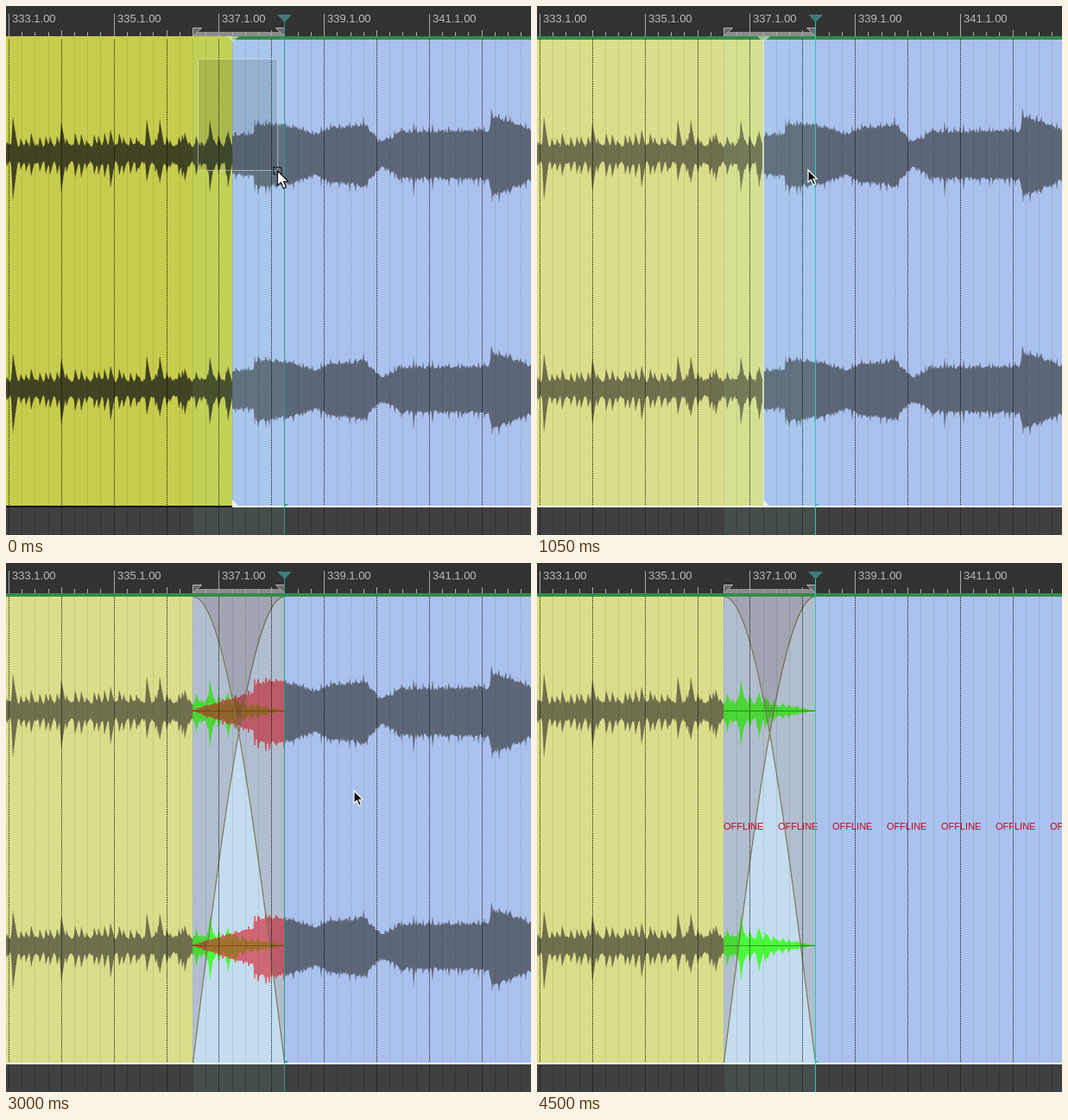
Recreate the animation shown at these times as an HTML page with a canvas. Size 608 by 613 pixels, loop 4600 ms.

```html
<!DOCTYPE html>
<html lang="en">
<head>
<meta charset="utf-8">
<title>Crossfade edit</title>
<style>
html, body { margin: 0; width: 100%; height: 100%; overflow: hidden; background: #333; }
canvas { display: block; width: 608px; height: 613px; }
</style>
</head>
<body>
<canvas id="stage" width="608" height="613"></canvas>
<script>
const ctx = document.getElementById('stage').getContext('2d');
const W = 608, H = 613, LOOP = 4600;
const TOP = 39, BOTTOM = 579, LEFT = 216, CUT = 262, RIGHT = 322;
const CENTERS = [171, 443];
const FONT = '"Liberation Sans", Arial, sans-serif';
const BLINKS = [150, 600, 1050, 1650, 2100, 2550, 3150, 3600, 4200];

// Loudest hits as x, height above and depth below the centre line.
const FIRST_HITS = [[8, 43, 55], [64, 37, 45], [121, 28, 40], [163, 40, 33],
  [178, 40, 35], [207, 25, 33], [236, 39, 45], [257, 27, 40]];
const SECOND_HITS = [[288, 41, 46], [322, 34, 43], [414, 44, 40], [472, 38, 51],
  [494, 36, 44], [562, 52, 38]];

// Loudness of the second clip as x, level.
const LOUDNESS = [[216, 20], [287, 22], [290, 34], [330, 31], [358, 22], [376, 29],
  [416, 32], [432, 14], [446, 17], [455, 25], [559, 26], [563, 43], [577, 39], [608, 27]];

function noise(x, seed) {
  const v = Math.sin(x * 12.9898 + seed * 78.233) * 43758.5453;
  return v - Math.floor(v);
}

function loudness(x) {
  const i = LOUDNESS.findIndex(([px]) => px >= x);
  if (i < 1) return LOUDNESS[0][1];
  const [x0, a] = LOUDNESS[i - 1], [x1, b] = LOUDNESS[i];
  return a + (b - a) * (x - x0) / (x1 - x0);
}

// Adds seeded small hits, one per cell, to the loud ones.
function withSmallHits(hits, step, rise, level) {
  const all = [...hits];
  for (let i = 0; i * step < W; i++) {
    const x = Math.round((i + noise(i, 1) * 0.7) * step);
    const h = level(x) + rise * (0.3 + 0.7 * noise(i, 2));
    all.push([x, h, h * (1.05 + 0.2 * noise(i, 5))]);
  }
  return all;
}

function envelope(hits, level, decay, seed, side) {
  const out = [];
  for (let x = 0; x <= W; x++) {
    let v = level(x) * (side ? 1.12 : 1) + (noise(x, seed + side) - 0.4) * 5;
    for (const hit of hits) {
      const d = x - hit[0];
      const k = 1 - (d < 0 ? -d / 3 : d / decay);
      if (k > 0) v = Math.max(v, hit[1 + side] * Math.pow(k, 1.3));
    }
    out.push(v);
  }
  return out;
}

function track(hits, step, rise, decay, level) {
  const all = withSmallHits(hits, step, rise, level);
  return CENTERS.map((cy, i) => ({
    cy,
    gain: i ? 0.95 : 1,
    up: envelope(all, level, decay, 3 + i, 0),
    down: envelope(all, level, decay, 3 + i, 1)
  }));
}

const first = track(FIRST_HITS, 7, 16, 8, () => 9);
const second = track(SECOND_HITS, 8, 8, 5, loudness);

const fadeIn = x => Math.sin((x - LEFT) / (RIGHT - LEFT) * Math.PI / 2);
const fadeOut = x => Math.cos((x - LEFT) / (RIGHT - LEFT) * Math.PI / 2);

function rect(x, y, w, h, color) {
  ctx.fillStyle = color;
  ctx.fillRect(x, y, w, h);
}

function poly(points, fill, stroke, width = 1) {
  ctx.beginPath();
  points.forEach(([x, y]) => ctx.lineTo(x, y));
  ctx.closePath();
  if (fill) { ctx.fillStyle = fill; ctx.fill(); }
  if (stroke) { ctx.strokeStyle = stroke; ctx.lineWidth = width; ctx.stroke(); }
}

function line(points, color, width) {
  ctx.strokeStyle = color;
  ctx.lineWidth = width;
  ctx.beginPath();
  points.forEach(([x, y]) => ctx.lineTo(x, y));
  ctx.stroke();
}

function vline(x, y0, y1, color, dash = []) {
  ctx.setLineDash(dash);
  line([[x + 0.5, y0], [x + 0.5, y1]], color, 1);
  ctx.setLineDash([]);
}

function wave(channels, x0, x1, fill, gain = () => 1, edge) {
  for (const c of channels) {
    const points = [];
    for (let x = x0; x <= x1; x++) points.push([x, c.cy - c.up[x] * c.gain * gain(x)]);
    for (let x = x1; x >= x0; x--) points.push([x, c.cy + c.down[x] * c.gain * gain(x)]);
    if (edge) ctx.setLineDash([2, 1]);
    poly(points, fill, edge);
    ctx.setLineDash([]);
  }
}

const gridX = i => Math.round(2.95 + i * 15.215);

function ruler() {
  rect(0, 0, W, 36, '#323232');
  rect(217, 30, 105, 5, '#8c8c8c');
  ctx.font = '13px ' + FONT;
  for (let i = 0; i < 40; i++) {
    const x = gridX(i);
    const y = i % 8 === 0 ? 9 : i % 4 === 0 ? 28 : 30;
    vline(x, y, 35, '#a8a8a8');
    if (i % 8 === 0) {
      ctx.fillStyle = '#bcbcbc';
      ctx.fillText(333 + i / 4 + '.1.00', x + 4, 19);
    }
  }
  poly([[216.5, 25.5], [226.5, 25.5], [216.5, 35]], '#6a6a6a', '#b4b4b4');
  poly([[312.5, 25.5], [322.5, 25.5], [322.5, 35]], '#6a6a6a', '#b4b4b4');
}

function grid() {
  for (let i = 0; i < 40; i++) {
    const main = i % 4 === 0;
    vline(gridX(i), TOP, BOTTOM, main ? 'rgba(0,0,0,.9)' : 'rgba(0,0,0,.17)', [1, 1]);
    vline(gridX(i), 581, H, main ? 'rgba(0,0,0,.4)' : 'rgba(0,0,0,.2)');
  }
}

function fadeCurve(curve) {
  const points = [];
  for (let x = LEFT; x <= RIGHT; x++) points.push([x + 0.5, BOTTOM - (BOTTOM - TOP) * curve(x)]);
  return points;
}

function crossfade(offline) {
  rect(LEFT, TOP, RIGHT - LEFT, BOTTOM - TOP, '#c4dcf0');
  wave(first, LEFT, RIGHT, '#4bf93b', fadeOut);
  if (!offline) wave(second, LEFT, RIGHT, 'rgba(215,25,35,.6)', fadeIn, '#f04048');
  for (const cy of CENTERS) rect(LEFT, cy, RIGHT - LEFT, 1, offline ? '#28a020' : '#8a4412');
  ctx.save();
  ctx.beginPath();
  ctx.rect(LEFT, TOP, RIGHT - LEFT, BOTTOM - TOP);
  ctx.clip();
  for (const curve of [fadeIn, fadeOut]) {
    const points = fadeCurve(curve);
    poly([[LEFT, TOP], ...points, [RIGHT, TOP]], 'rgba(70,20,25,.15)');
    line(points, '#7c7852', 1.2);
  }
  ctx.restore();
}

function clips(t) {
  const selected = t < 600, faded = t >= 2550, offline = t >= 4500;
  const end = faded ? LEFT : CUT, start = faded ? RIGHT : CUT;
  rect(0, 36, W, H - 36, '#404040');
  rect(0, 35, end, BOTTOM - 35, selected ? '#c6cc4c' : '#dade8a');
  rect(start, 35, W - start, BOTTOM - 35, '#abc1ed');
  wave(first, 0, faded ? end : t < 900 ? CUT : CUT - 1, selected ? '#424322' : '#6f6f4d');
  if (!offline) wave(second, start, W, '#5d6678');
  if (faded) crossfade(offline);
  const tintTop = faded ? 581 : 36;
  rect(LEFT, tintTop, RIGHT - LEFT, H - tintTop, 'rgba(150,255,220,.075)');
  grid();

  const from = selected ? CUT : 0;
  rect(from, 35, W - from, 4, '#318c4b');
  rect(0, BOTTOM, W, 2, '#080808');
  rect(from, BOTTOM, W - from, 2, '#f2f4f6');
  if (!faded) {
    if (!selected) vline(CUT, TOP, BOTTOM, 'rgba(240,246,255,.75)');
    poly([[255, 35], [270, 35], [262.5, 42]], 'rgba(215,228,190,.65)');
    poly([[262, 572], [269, 579], [262, 579]], '#e8eefa');
  }
}

function marquee() {
  rect(222, 61, 93, 130, 'rgba(0,0,0,.115)');
  ctx.strokeStyle = 'rgba(240,248,235,.5)';
  ctx.lineWidth = 1;
  ctx.strokeRect(222.5, 61.5, 92, 129);
}

function offlineLabels() {
  ctx.font = '11px ' + FONT;
  ctx.fillStyle = '#bf0820';
  for (let x = LEFT; x < W; x += 63) ctx.fillText('OFFLINE', x, 309);
}

function playhead(bright) {
  const color = bright ? '#35c4b0' : '#2f9a8b';
  vline(RIGHT, 18, H, color);
  rect(RIGHT, 577, 4, 2, color);
  poly([[314, 10], [331, 10], [322.5, 19]], '#3c7d76');
}

function arrow(x, y, size, fill, edge) {
  const shape = [[0, 0], [0, 17], [4, 13.5], [7, 20.5], [10, 19], [7, 12.5], [12, 12]];
  ctx.lineJoin = 'miter';
  poly(shape.map(([a, b]) => [x + a * size, y + b * size]), fill, edge, 1.2);
}

const pointer = (x, y) => arrow(x, y, 0.84, '#0a0a0a', '#fff');

function rangeCursor() {
  poly([[315, 182.5], [321.5, 189.5], [308.5, 189.5]], '#fff', '#111');
  poly([[315, 203], [321.5, 196.5], [308.5, 196.5]], '#fff', '#111');
  rect(311, 189, 8, 8, '#fff');
  line([[311, 190.5], [317.5, 190.5], [312, 195.5], [319, 195.5]], '#0a0a0a', 1.6);
  poly([[321, 184], [329, 184], [328.5, 192], [325, 196], [322, 192]], '#0a0a0a');
  vline(325, 185, 190, '#aaa');
}

function marqueeCursor() {
  ctx.setLineDash([2, 1]);
  ctx.strokeStyle = '#101010';
  ctx.lineWidth = 1.5;
  ctx.strokeRect(310, 187, 9, 8);
  ctx.setLineDash([]);
  arrow(314.5, 191, 1, '#fff', '#111');
}

function cursor(t) {
  if (t < 600) marqueeCursor();
  else if (t < 1650) pointer(314, 190);
  else if (t < 2700) rangeCursor();
  else if (t < 3000) pointer(307, 184);
  else if (t < 3150) pointer(403, 264);
  else if (t < 3450) pointer(505, 331);
  else if (t < 3600) pointer(504, 329);
  else if (t < 3750) pointer(584, 537);
}

function draw(t) {
  ctx.lineJoin = 'bevel';
  ruler();
  clips(t);
  if (t < 600) marquee();
  if (t >= 4500) offlineLabels();
  playhead(BLINKS.filter(b => b <= t).length % 2 === 1);
  cursor(t);
}

const begin = performance.now();
function tick() {
  draw((performance.now() - begin) % LOOP);
  requestAnimationFrame(tick);
}
tick();
</script>
</body>
</html>
```
